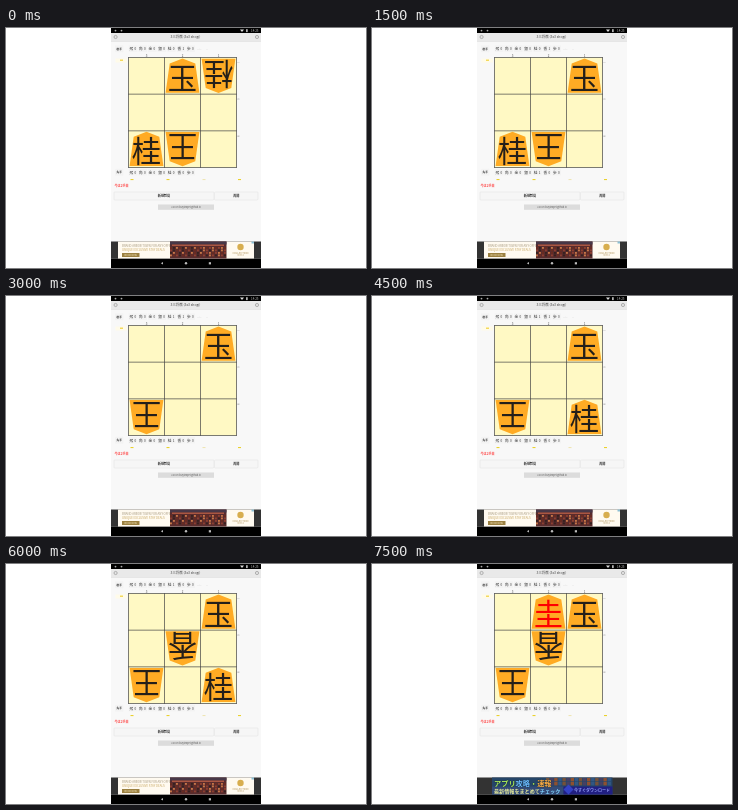
Animation of 360x240 px, one loop 8 s. Source, as an HTML page:

```html
<!DOCTYPE html>
<html lang="ja">
<head>
<meta charset="utf-8">
<title>3x3 shogi</title>
<style>
  html, body { margin: 0; width: 100%; height: 100%; overflow: hidden; background: #fff; }
  svg { display: block; width: 100vw; height: 100vh; }
  text { font-family: "Noto Sans CJK JP", "Noto Sans CJK", sans-serif; }
</style>
</head>
<body>
<svg id="stage" viewBox="0 0 360 240"></svg>
<script>
const stage = document.getElementById('stage');
const COLS = [140.5, 176.5, 212.5], ROWS = [47.7, 84.3, 121];
const STEP = 1500, LOOP = 8000;

const rect = (x, y, w, h, fill, extra = '') =>
  `<rect x="${x}" y="${y}" width="${w}" height="${h}" fill="${fill}" ${extra}/>`;
const circle = (x, y, r, fill, extra = '') =>
  `<circle cx="${x}" cy="${y}" r="${r}" fill="${fill}" ${extra}/>`;
const text = (x, y, size, s, fill = '#333', extra = '') =>
  `<text x="${x}" y="${y}" font-size="${size}" fill="${fill}" ${extra}>${s}</text>`;
const path = (d, stroke, width) => `<path d="${d}" fill="none" stroke="${stroke}" stroke-width="${width}"/>`;
const MID = 'text-anchor="middle" ', BOLD = 'font-weight="700"';

// A piece is [kanji, column, row, flipped].
function piece([kanji, col, row, flipped]) {
  const colour = kanji === '圭' ? '#f00' : '#241f1a';
  return `<g transform="translate(${COLS[col]} ${ROWS[row]}) rotate(${flipped ? 180 : 0})">
    <path d="M0-17.2L12.8-12.2L16.9 17H-16.9L-12.8-12.2Z" fill="#ffab24"/>
    ${text(0, 12.9, 29.3, kanji, colour, MID + 'font-weight="500"')}</g>`;
}

function hand(y, side, knights, lances) {
  const counts = { 桂: knights, 香: lances };
  return rect(109, y - 3.5, 8.5, 7, '#f3f3f3', 'rx=".8"') + text(113.2, y + 1.1, 2.7, side, '#333', MID + BOLD) +
    [...'飛角金銀桂香歩'].map((kanji, i) => {
      const x = 123.4 + i * 9.6;
      return rect(x - .6, y - 3.3, 8.6, 6.4, '#f3f3f3') + text(x, y + 1.4, 3.7, kanji) +
        text(x + 5, y + 1.2, 3.1, counts[kanji] || 0);
    }).join('');
}

function chrome() {
  const buttons = [[108, 100, '新規対局'], [208.5, 43.5, '再開']].map(([x, w, label]) =>
    rect(x, 164, w, 8, '#f6f6f6', 'stroke="#e4e4e4" stroke-width=".6" rx=".8"') +
    text(x + w / 2, 169.1, 3.1, label, '#333', MID + BOLD)).join('');
  return rect(105, 0, 150, 240, '#f8f8f8') + rect(105, 0, 150, 5, '#000') +
    circle(109.5, 2.6, .9, '#aaa') + circle(115.5, 2.6, .9, '#aaa') +
    '<path d="M234 1.5H238L236 4Z" fill="#ddd"/>' + rect(240.2, 1.2, 1.4, 2.9, '#ddd') +
    text(245, 3.8, 3, '14:25', '#ccc') +
    rect(105, 5, 150, 8.3, '#e9e9e9') + rect(105, 13, 150, .5, '#d8d8d8') +
    circle(109.6, 9, 1.6, '#e4e4e4', 'stroke="#999" stroke-width=".7"') +
    circle(251, 9, 1.6, '#e4e4e4', 'stroke="#999" stroke-width=".7"') +
    text(179.5, 10.3, 3.4, '3三将棋 (3x3 shogi)', '#444', MID + 'font-weight="500"') +
    text(191, 21.7, 2.7, '--:--', '#bbb') + text(200, 21.7, 2.7, '--', '#bbb') +
    [3, 2, 1].map((n, i) => text(COLS[i], 28.6, 3, n, '#444', MID)).join('') +
    [...'一二三'].map((n, i) => text(230.9, ROWS[i] - 12, 2.8, n, '#888')).join('') +
    text(108.5, 158.6, 3.1, '今は2手目', '#f44', BOLD) + buttons +
    rect(152, 176.5, 56, 5.3, '#dcdcdc') +
    text(180, 179.9, 2.3, '©2017 dozylimpet.github.io', '#555', MID) +
    rect(105, 213.5, 150, 17, '#333') + rect(105, 230.5, 150, 9.5, '#000') +
    '<path d="M157 234V236.6L154.8 235.3Z" fill="#bbb"/>' + circle(180, 235.3, 1.2, '#bbb') +
    rect(202.8, 234.2, 2.2, 2.2, '#bbb');
}

function board() {
  let lines = '';
  for (let i = 0; i < 4; i++) {
    lines += `M${122.5 + i * 36} 29.2V139.8M122.2 ${29.5 + i * 36.67}H230.8`;
  }
  return rect(122.5, 29.5, 108, 110, '#fff9c4') + path(lines, '#444', .7);
}

function hotelAd() {
  const tones = ['#6b2b20', '#c77748', '#35211f', '#8e3f30'];
  let crowd = '';
  for (let i = 0; i < 76; i++) {
    crowd += rect(164 + i % 19 * 3, 219 + Math.floor(i / 19) * 2.5, 1.9, 1.8, tones[Math.floor(i * 2.7) % 4]);
  }
  return rect(112, 213.5, 136, 17, '#fffaf0') +
    text(116, 218.5, 2.9, 'BRAND ARBOR TOWN FOR ANY OFFER', '#a5987e', 'font-family="Noto Sans CJK JP, sans-serif"') +
    text(116, 222.5, 2.9, 'UNIQUE EXCLUSIVE STAY DEALS', '#c6a660') +
    rect(116, 225, 17.5, 4, '#9b8040') + text(124.7, 227.9, 2.3, 'BOOK NOW', '#fff0c4', MID) +
    rect(164, 213.5, 56.5, 17, '#592c2d') + rect(164, 213.5, 56.5, 3, '#473747') +
    rect(166, 216.5, 52, 1.5, '#a95642') + crowd +
    circle(234.5, 219, 3.2, '#d8ae4e') +
    text(234.5, 225.5, 2.7, 'COLLECTION', '#a98a4c', MID) +
    text(234.5, 228.1, 1.7, 'HOTELS', '#a98a4c', MID) + rect(245.5, 213.5, 2.5, 2, '#8bbfd4');
}

function gameAd() {
  const tones = ['#755139', '#315783', '#8e5030', '#464063'];
  let blocks = '';
  for (let i = 0; i < 32; i++) {
    blocks += rect(174 + i % 16 * 4.1, 214 + (i > 15) * 4, 3.4, 3.4, tones[i * 7 % 4]);
  }
  return rect(120, 213.5, 120.5, 17, '#254568') + blocks +
    rect(120, 222.5, 71.5, 8, '#344b77') + rect(191.5, 222.5, 49, 8, '#211f82') +
    text(122, 221.5, 7.2, 'アプリ<tspan fill="#6bbcff">攻略</tspan>・<tspan fill="#ffad43">速報</tspan>', '#a8e858',
      'font-weight="900" stroke="#152b3e" stroke-width=".6" paint-order="stroke"') +
    text(122, 228.7, 5.1, '最新情報をまとめて<tspan fill="#82d6ff">チェック</tspan>', '#e8ec9b', BOLD) +
    '<path d="M196.5 220.5L201.5 225.5L196.5 230.5L191.5 225.5Z" fill="#3442c5"/>' +
    text(202, 228, 4, '今すぐダウンロード', '#929cf5', BOLD);
}

const KING = ['玉', 2, 0, false], RIVAL = ['王', 0, 2, true], LANCE = ['香', 1, 1, true];
// hands: upper knights, upper lances, lower knights
const positions = [
  { pieces: [['玉', 1, 0], ['桂', 2, 0, true], ['桂', 0, 2], ['王', 1, 2, true]], hands: [0, 1, 0] },
  { pieces: [KING, ['桂', 0, 2], ['王', 1, 2, true]], hands: [0, 1, 1] },
  { pieces: [KING, RIVAL], hands: [1, 1, 1] },
  { pieces: [KING, RIVAL, ['桂', 2, 2]], hands: [1, 1, 0] },
  { pieces: [KING, RIVAL, ['桂', 2, 2], LANCE], hands: [1, 0, 0] },
  { pieces: [KING, RIVAL, ['圭', 1, 0], LANCE], hands: [1, 0, 0] },
];

function marks() {
  return rect(109.5, 30.5, 11.5, 4, '#fffbe9') + rect(114, 31.6, 3, 1.2, '#f1d23c') +
    [126, 162, 198, 233.5].map((x, i) =>
      rect(x - 1.5, 151, 3, 1.1, i === 2 ? '#eee5b5' : '#ead12e')).join('');
}

function scene(index) {
  const { pieces, hands: [upperKnights, upperLances, lowerKnights] } = positions[index];
  return chrome() + hand(20.7, '後手', upperKnights, upperLances) + hand(144.3, '先手', lowerKnights, 0) +
    marks() + board() + pieces.map(piece).join('') + (index === 5 ? gameAd() : hotelAd());
}

let shown = -1;
function draw() {
  const index = Math.floor(performance.now() % LOOP / STEP);
  if (index !== shown) stage.innerHTML = scene(shown = index);
  requestAnimationFrame(draw);
}
draw();
</script>
</body>
</html>
```
